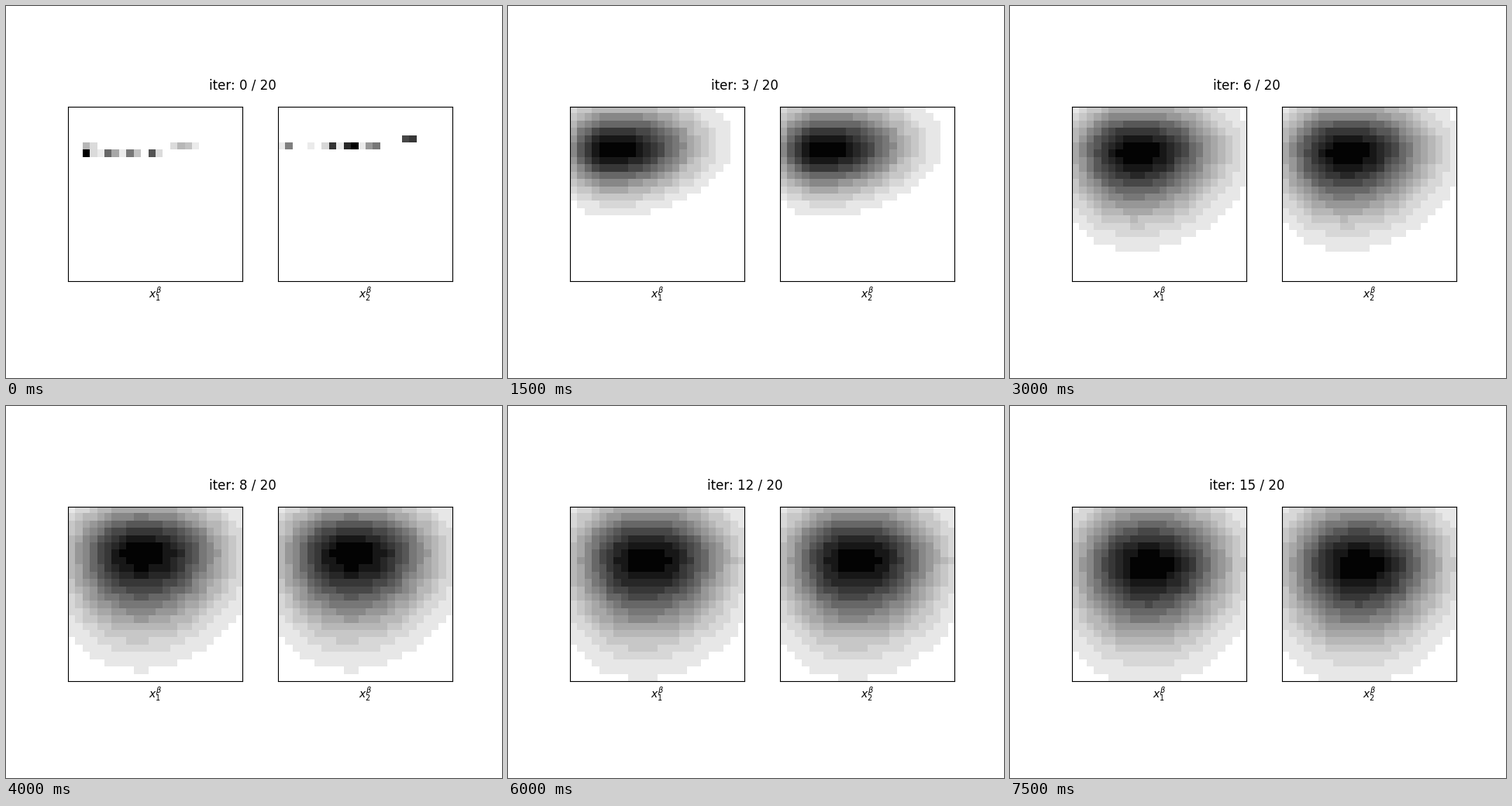
Animation of 640 by 480 pixels, one loop 8000 ms. Source, as a matplotlib script:

```python
import numpy as np
import matplotlib.pyplot as plt
from matplotlib.animation import FuncAnimation

N = 24
LAST = 20
STEPS = 16

# Starting marks: (row, first column, grey values)
START = [
    [(5, 2, [183, 219]),
     (5, 14, [219, 183, 195, 235]),
     (6, 2, [0, 219, 235, 103, 167, 235, 119, 195, 255, 83, 219])],
    [(4, 17, [71, 55]),
     (5, 0, [235, 127]),
     (5, 4, [235, 255, 215, 51, 235, 39, 0, 235, 151, 119])],
]


def start_image(marks):
    img = np.full((N, N), 255.0)
    for row, col, greys in marks:
        img[row, col:col + len(greys)] = greys
    return img


def smoothstep(t, begin, end):
    u = np.clip((t - begin) / (end - begin), 0, 1)
    return u * u * (3 - 2 * u)


def side(dist, size, power):
    """Fall-off on the positive side of an axis."""
    return (np.maximum(dist, 0) / size) ** power


def blob_image(it):
    """A lopsided bell that spreads early and then sinks slowly."""
    s = smoothstep(it, 1, 9)
    row, col = np.mgrid[:N, :N]
    dy = row - (5.6 + 0.0095 * it ** 2)
    below = np.maximum(dy, 0)
    dx = col - (4.6 + 5.5 * s) + 0.04 * s * below

    energy = (side(-dx, 5.6 + 3.6 * s, 2.5)
              + side(dx, 10.3, 2.3)
              + side(-dy, 4.6 + 0.2 * it, 2.1)
              + side(dy, 4.3 + 4.8 * s, 1.8))
    energy += (0.005 - 0.004 * s) * np.abs(dx) * below
    energy -= 0.005 * (1 - s) * np.maximum(dx, 0) * np.maximum(-dy, 0)
    grey = 255 * (1 - np.exp(-np.maximum(energy, 0)))

    # Sixteen grey steps, with near-black and white at the ends
    level = grey // 16
    return np.select([level == 0, level == 15], [3, 255], level * 16 + 7)


fig, axes = plt.subplots(1, 2, figsize=(6.4, 4.8), dpi=100)
images = []
for i, ax in enumerate(axes):
    images.append(ax.imshow(start_image(START[i]), cmap="gray", vmin=0,
                            vmax=255, interpolation="nearest"))
    ax.set_xticks([])
    ax.set_yticks([])
    ax.set_xlabel(rf"$x_{i + 1}^\beta$")
title = axes[0].text(1.0, 1.1, "", transform=axes[0].transAxes,
                     ha="center", fontsize=12)


def update(it):
    for image, marks in zip(images, START):
        image.set_data(blob_image(it) if it else start_image(marks))
    title.set_text(f"iter: {it} / {LAST}")
    return [*images, title]


anim = FuncAnimation(fig, update, frames=STEPS, interval=500,
                     repeat=True, repeat_delay=0, blit=False)
plt.show()
```
